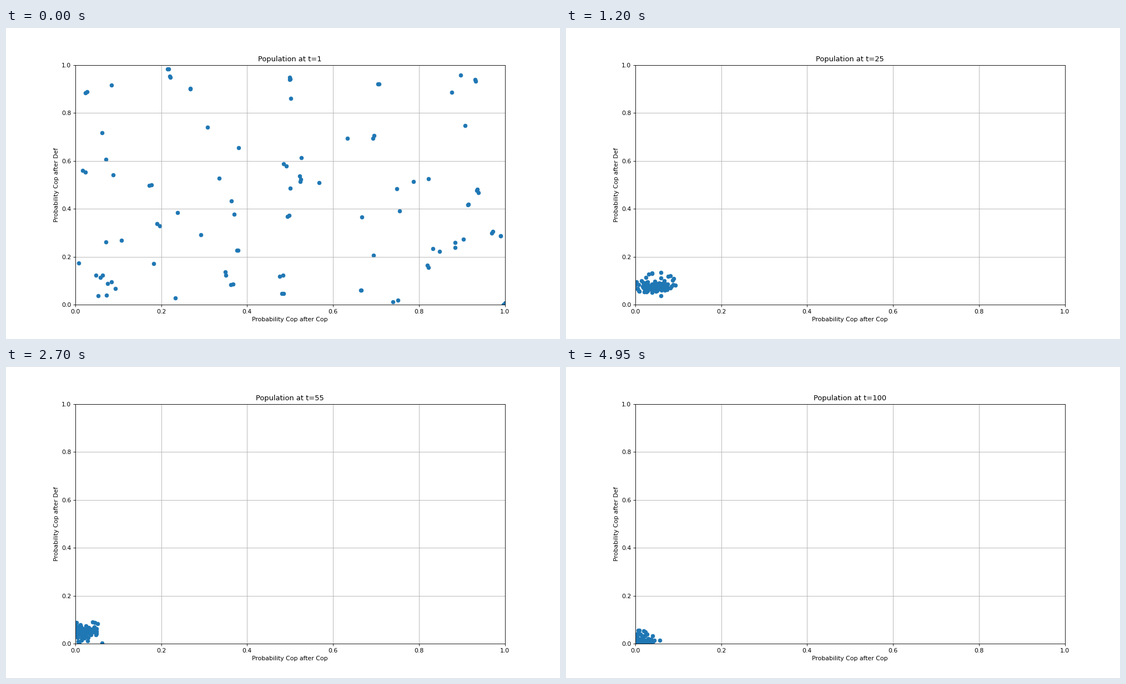
These frames come from a looping animation (998 px wide and 561 px high, 5050 ms). A matplotlib script:

```python
import numpy as np
import matplotlib.pyplot as plt
from matplotlib.animation import FuncAnimation

W, H, DPI = 998, 561, 78
GENERATIONS = 100
HOLD = 1            # extra ticks on the last generation
SIZE, FOUNDERS = 100, 70
MUTATION = 0.0075

# Founders at the edges of the strategy square
EDGE_FOUNDERS = [(0.084, 0.095), (0.073, 0.04), (0.048, 0.122),
                 (0.997, 0.0), (0.99, 0.288), (0.931, 0.94),
                 (0.217, 0.983), (0.023, 0.883), (0.023, 0.553)]


def mutate(people, rng):
    return np.clip(people + rng.normal(0, MUTATION, people.shape), 0, 1)


def first_generation(rng):
    """Scattered founders, denser at the bottom, some with a sibling."""
    founders = rng.random((FOUNDERS, 2))
    founders[:, 1] **= 1.4
    founders[:len(EDGE_FOUNDERS)] = EDGE_FOUNDERS
    siblings = mutate(founders[:SIZE - FOUNDERS], rng)
    return np.vstack([founders, siblings])


def fittest(t):
    """Strategy favoured by selection at generation t."""
    times = [12, 25, 36, 48, 72, 100]
    return np.array([
        np.interp(t, times, [0.070, 0.045, 0.030, 0.017, 0.010, 0.007]),
        np.interp(t, times, [0.082, 0.062, 0.052, 0.046, 0.020, 0.012]),
    ])


def evolve():
    rng = np.random.default_rng(4)
    history = [first_generation(rng)]
    for t in range(2, GENERATIONS + 1):
        people = history[-1]
        pressure = np.interp(t, [40, 80], [8, 15])
        distance = np.hypot(*(people - fittest(t)).T)
        weight = np.exp(-pressure * distance)
        parents = rng.choice(SIZE, SIZE, p=weight / weight.sum())
        history.append(mutate(people[parents], rng))
    return history


history = evolve()

fig, ax = plt.subplots(figsize=(W / DPI, H / DPI), dpi=DPI)

# Margins of a 12.8 x 7.2 inch layout, cropped to whole pixels
sx, sy = 12.8 * DPI / W, 7.2 * DPI / H
fig.subplots_adjust(left=0.125 * sx, right=0.9 * sx,
                    bottom=0.11 * sy, top=0.88 * sy)

dots = ax.scatter(*history[0].T)
ax.set(xlim=(0, 1), ylim=(0, 1),
       xlabel="Probability Cop after Cop", ylabel="Probability Cop after Def")
ax.grid()
title = ax.set_title("Population at t=1")


def draw(frame):
    t = min(frame, GENERATIONS - 1)
    dots.set_offsets(history[t])
    title.set_text(f"Population at t={t + 1}")
    return dots, title


anim = FuncAnimation(fig, draw, frames=GENERATIONS + HOLD, interval=50,
                     repeat=True)
plt.show()
```
